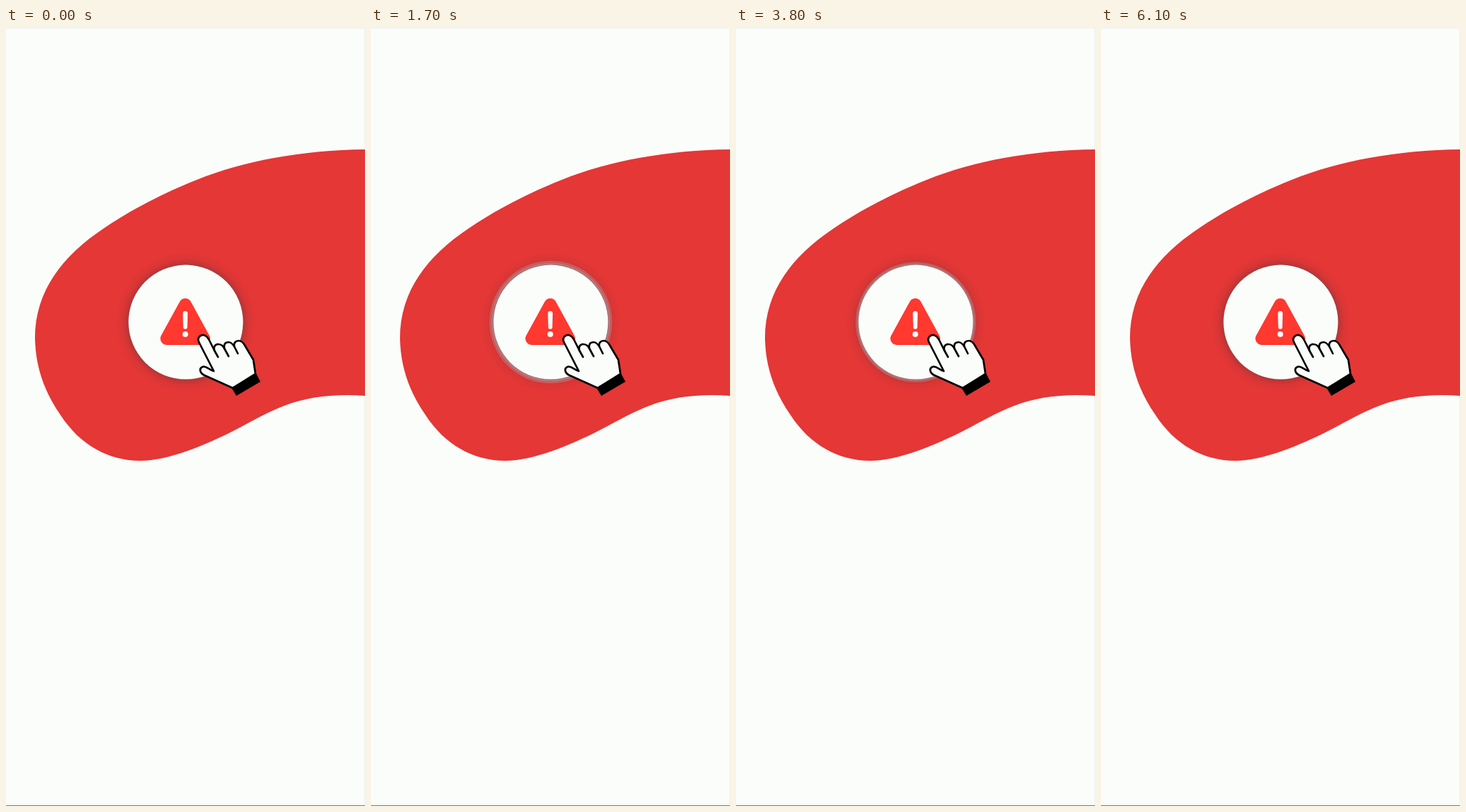
Recreate the animation shown at these times as an HTML page. Size 508 px wide and 1102 px high, loop 6.2 s.

```html
<!DOCTYPE html>
<html lang="en">
<head>
<meta charset="utf-8">
<title>Alert button</title>
<style>
  html, body { margin: 0; width: 100%; height: 100%; overflow: hidden; background: #fbfdfa; }
  svg { display: block; width: 100%; height: 100%; }
</style>
</head>
<body>
<svg viewBox="0 0 508 1102">
  <defs>
    <radialGradient id="shade" gradientUnits="userSpaceOnUse" cx="254.4" cy="416.6" r="99">
      <stop offset=".81" stop-color="#5a464c" stop-opacity=".55"/>
      <stop offset=".84" stop-color="#6e3238" stop-opacity=".32"/>
      <stop offset=".9" stop-color="#78282c" stop-opacity=".1"/>
      <stop offset="1" stop-color="#78282c" stop-opacity="0"/>
    </radialGradient>
  </defs>

  <path d="M0 .5H508M507.5 0V1102" stroke="#f0f1f0"/>
  <path d="M0 1101.5H508" stroke="#777"/>

  <path fill="#e43736" d="M508 172C420 173 337 188 270 215C220 235 178 257 138 284
    C80 323 41 372 41 440C42 480 54 515 77 548C104 590 145 613 190 613
    C230 613 284 590 323 570C350 556 368 545 394 535C428 522 466 518 508 521Z"/>

  <g transform="translate(254.4 416.6)">
    <circle id="outer" fill="#dedede" fill-opacity=".3"/>
    <circle id="inner" fill="#dedede" fill-opacity=".42"/>
  </g>
  <circle cx="254.4" cy="416.6" r="99" fill="url(#shade)"/>
  <circle cx="254.4" cy="416.6" r="81" fill="#fbfdfa"/>

  <path d="M253.7 392L280 440H227.4Z" fill="#ff3830" stroke="#ff3830" stroke-width="18" stroke-linejoin="round"/>
  <path d="M250.3 404.3a3.4 3.4 0 0 1 6.8 0L256.6 423.5a2.9 2.9 0 0 1-5.8 0Z" fill="#fbfdfa"/>
  <circle cx="253.7" cy="433.7" r="4" fill="#fbfdfa"/>

  <g stroke="#000" stroke-width="2.7" stroke-linecap="round" stroke-linejoin="round">
    <path fill="#fbfdfa" d="M321 510L281 492C274 489 273 482 278 480C283 478 287 484 294 486
      L273 445C270 439 275 434 280 435C284 436 286 439 288 443L295 457
      C293 451 297 447 301 448C305 448 307 450 309 454C308 448 310 445 315 445
      C319 445 321 448 323 451C322 446 325 443 329 443C333 443 335 445 337 448L350 470L353 490Z"/>
    <path fill="none" d="M295 457l5 9M309 454l6 11M323 451l5 10"/>
  </g>
  <path d="M319 509.5L354 489.5L360 501L326 521Z"/>
</svg>
<script>
  const LOOP = 6200, CYCLE = LOOP / 3, STEP = 100;
  const MOVE = 667, GROW_AT = 333, SHRINK_AT = 1333;
  const REST = 81, OUTER = 128, INNER = 104.5;

  const bezier = (a, b, s) => 3 * (1 - s) ** 2 * s * a + 3 * (1 - s) * s * s * b + s ** 3;

  // cubic-bezier(.62, 0, .02, 1), solved by bisection
  function ease(x) {
    if (x <= 0) return 0;
    if (x >= 1) return 1;
    let lo = 0, hi = 1;
    for (let i = 0; i < 24; i++) {
      const mid = (lo + hi) / 2;
      if (bezier(.62, .02, mid) < x) lo = mid; else hi = mid;
    }
    return bezier(0, 1, lo);
  }

  const outer = document.getElementById('outer');
  const inner = document.getElementById('inner');

  function draw(now) {
    // the pulse advances ten times a second
    const time = Math.floor((now % LOOP + 5) / STEP) * STEP % LOOP;
    const t = time % CYCLE;
    const grow = ease((t - GROW_AT) / MOVE) - ease((t - SHRINK_AT) / MOVE);
    outer.setAttribute('r', REST + (OUTER - REST) * grow);
    inner.setAttribute('r', REST + (INNER - REST) * grow);
  }

  function loop(now) {
    draw(now);
    requestAnimationFrame(loop);
  }
  draw(0);
  requestAnimationFrame(loop);
</script>
</body>
</html>
```
